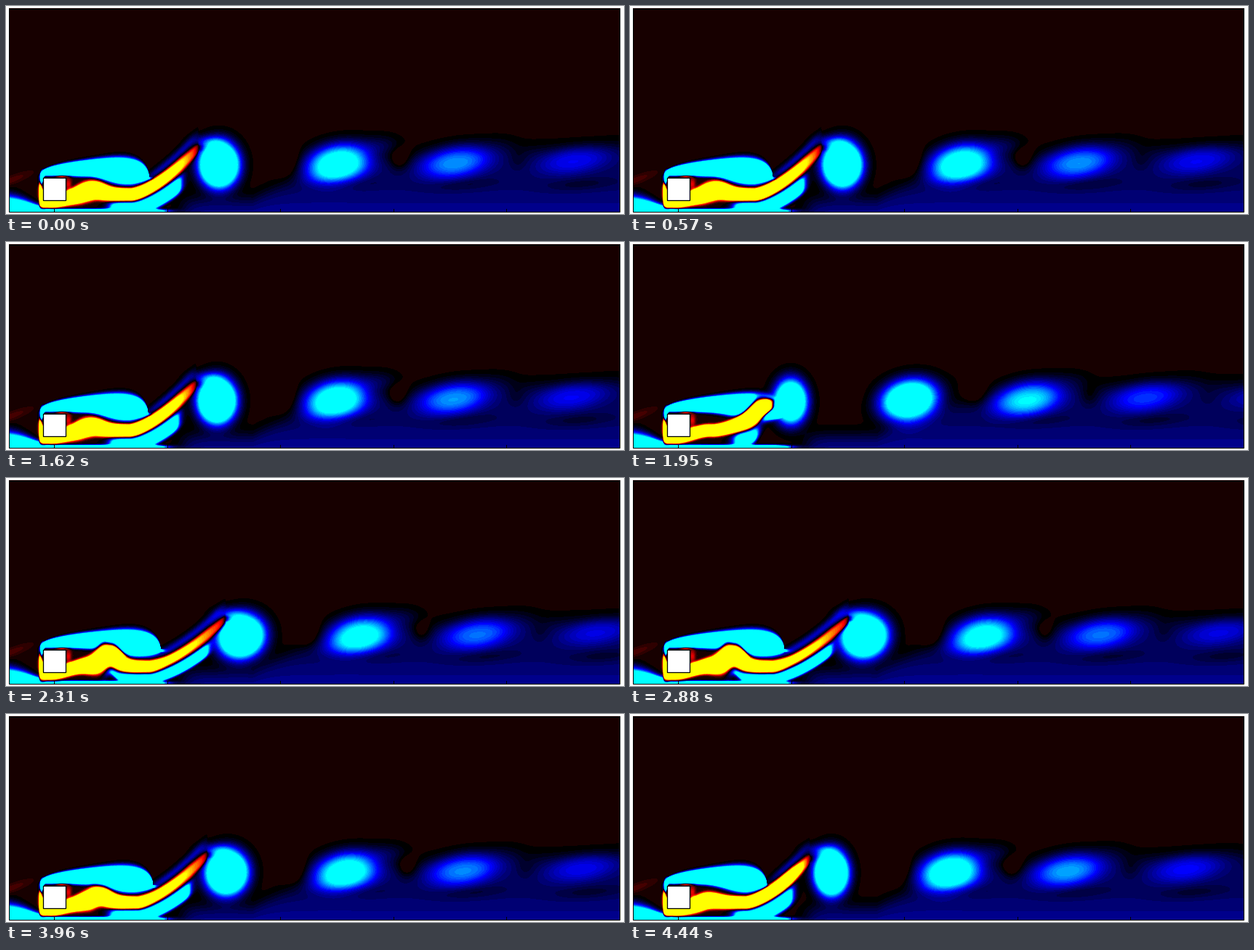
A matplotlib script for the animation above (4470 ms loop, 850 by 287 pixels).

```python
import numpy as np
import matplotlib.pyplot as plt
from matplotlib.animation import FuncAnimation
from matplotlib.colors import ListedColormap
from matplotlib.patches import Rectangle

W, H, DPI = 850, 287, 64
PX = 72 / DPI
FRAMES, INTERVAL = 149, 30
PERIOD, SPACING = 19.11, 163      # frames per shedding cycle, px between vortices
FULL = 60                         # peak strength of a shear layer, in colour bands

X0, X1, Y0, Y1, NEAR = 4, 845, 160, 284, 376
x = np.arange(X0, X1, dtype=np.float32) + 0.5
y = (np.arange(Y0, Y1, dtype=np.float32) + 0.5)[:, None]
xn = x[:NEAR]


def sig(v):
    return 1 / (1 + np.exp(-np.clip(v, -40, 40)))


def smooth(v):
    v = np.clip(v, 0, 1)
    return v * v * (3 - 2 * v)


def flat(u):
    return np.exp(-np.square(np.square(u)))


def bump(cx, cy, sx, sy, tilt=0, power=1, gx=x):
    dx = gx - cx
    r2 = (dx / sx) ** 2 + ((y - cy + tilt * dx) / sy) ** 2
    return np.exp(-r2 ** power if power != 1 else -r2)


def static_layers():
    """Background, slow wake over the floor and the incoming wall layer."""
    top = 195 + 72 * np.exp(-np.clip(x - 340, 0, None) / 125)
    depth = 5 + 2 * np.clip((y - 245) / 38, 0, 1)
    wake = depth * sig((y - top) / 6) * sig((x - 245) / 7)
    height = 2.5 + 14 * sig((34 - x) / 12)
    wall = 80 * sig((210 - x) / 8) * np.exp(-((283 - y) / height) ** 2)
    return (0.4 - wake - wall).astype(np.float32)


BASE = static_layers()
BODY_SKIN = (2.3 * bump(8, 240, 26, 6, 0.36, gx=xn)
             + 20 * bump(77, 235, 9, 1.6, gx=xn)
             + 9 * bump(86, 246, 4, 10, gx=xn))


def add_vortex(w, cx):
    """One shed vortex; it widens, flattens and weakens downstream."""
    grown = smooth((cx - 190) / 45)
    if grown == 0:
        return
    s = (cx - 293) / SPACING
    age = max(s, 0)
    w -= (58 * grown * 2.05 ** -age
          * bump(cx, 219 - 2.2 * s, 48 - 22 * np.exp(-1.5 * max(s, -0.1)),
                 30 - 4 * age, 0.14 * (1 - np.exp(-3 * age)), 1.35))
    curl = smooth((cx - 240) / 30) * smooth((370 - cx) / 60)
    if curl:
        w -= 8 * curl * bump(cx - 14, 187, 20, 8)
    far = smooth((s - 0.5) / 0.4)
    if far:
        late = far * np.exp(-max(s - 1, 0))
        w -= 3.5 * late * bump(cx + 60, 192, 26, 13)
        w += 4 * late * bump(cx + 84, 212, 12, 14)
        w += 5 * late * bump(cx - 70, 212, 16, 18)
        w += 2.2 * far * bump(cx + 8, 246, 45, 9, 0.08)


def upper_layer(p):
    """Sheet over the body: it stretches, then drops its end as a vortex."""
    end = 197 + 85 * p - 85 * smooth((p - 0.45) / 0.25)
    v = np.clip((xn - 46) / (end - 46), 0.001, 1)
    top = 236 - 31 * v ** 0.35 * np.sqrt(1 - v ** 7)
    low = 234 + 12 * np.exp(-((v - 0.8) / 0.25) ** 2) + 12 * sig((51 - xn) / 0.7)
    ends = sig((xn - 47) / 0.8) * sig((end - xn) / 3)
    return FULL * ends * flat((2 * y - top - low) / np.maximum(low - top, 3))


def lower_layer(p, age):
    """Signed distance, half width and tip of the sheet under the body.

    A hump drifts along it and ends up as the arm that rises to the tip.
    """
    tip = 165 + 15 * age + 85 * age ** 2
    trough = 172 + 130 * (age - 1)
    rise = np.clip((xn - trough) / (tip - trough), 0, 1) ** 1.5
    line = 260 + 10 * (1 - smooth((xn - 60) / 50)) - 66 * smooth(age / 1.1) * rise
    line -= 9 * np.clip((58 - xn) / 11, 0, 1.2) ** 2
    half = 8 - 1.8 * smooth((age - 0.9) / 0.3) * smooth((xn - trough) / 30)
    for a in (p, p - 1):
        crest = 122 + 110 * a
        line -= 15 * np.exp(-((a - 0.3) / 0.3) ** 2 - ((xn - crest) / 18) ** 2)
        half = half + 5.5 * flat((a - 0.25) / 0.4) * np.exp(-((xn - crest + 8) / 26) ** 2)
    half = half * (0.45 + 0.55 * np.sqrt(np.clip((tip - xn) / 25, 0, 1)))
    dist = (y - line) / np.sqrt(1 + np.gradient(line, xn) ** 2)
    return dist, half, tip


def field(phase):
    p = phase % 1
    w = BASE.copy()
    for k in range(-1, 5):
        add_vortex(w, 293 + SPACING * (p + k))

    near = w[:, :NEAR]
    near -= upper_layer(p)
    positive, keep = 0, 1
    for age in (p, p + 1):
        if not 0.18 <= age < 1.45:
            continue
        dist, half, tip = lower_layer(p, age)
        fade = min(1, (1.45 - age) / 0.27)
        thin = smooth((age - 0.9) / 0.3)
        ends = fade * sig((xn - 46) / 0.8) * sig((tip - xn) / 2.5)
        reach = 12 + 150 * smooth((age - 0.8) / 0.4)
        amp = 9 + (FULL - 9) * np.clip((tip - xn) / reach, 0, 1)
        positive = np.maximum(positive, amp * ends * flat(dist / half))
        keep = keep * (1 - ends * flat(dist / (1.45 * half)))
        # floor vorticity lifted under the arm, and a faint sheet above it
        span = fade * sig((xn - 145) / 4) * sig((tip - 25 - xn) / 3)
        near -= 45 * span * flat((dist - 20 + 4 * thin) / (10 - 3 * thin))
        span = fade * sig((xn - 195) / 6) * sig((tip - 8 - xn) / 5)
        near -= 9 * span * np.exp(-((dist + 13) / 6) ** 2)

    np.minimum(w, 0.5, out=w)
    near *= keep
    near += positive + BODY_SKIN
    return np.clip(np.floor(w), -23, 21)


def band_colour(i):
    """Cyan - blue - black - red - yellow."""
    c = (i + 1) / 11
    first, second = min(abs(c), 1), max(abs(c) - 1, 0)
    return (0, second, first) if c < 0 else (first, second, 0)


def phase_at(n):
    # the flow runs slightly ahead for part of the loop
    return (n + 3 * np.clip((n - 19) / 35, 0, 1)) / PERIOD


bands = ListedColormap([band_colour(i) for i in range(-23, 22)])

fig = plt.figure(figsize=(W / DPI, H / DPI), dpi=DPI, facecolor="white")
ax = fig.add_axes([0, 0, 1, 1])
ax.axis("off")
ax.add_patch(Rectangle((4, 3), 841, 281, fc=band_colour(0), ec="none"))
image = ax.imshow(field(0), cmap=bands, vmin=-23.5, vmax=21.5, aspect="auto",
                  extent=(X0, X1, Y1, Y0), interpolation="nearest", zorder=2)
ax.set_xlim(0, W)
ax.set_ylim(H, 0)
ax.add_patch(Rectangle((51.5, 236.5), 31, 31, fc="white", ec="black",
                       lw=1.3 * PX, zorder=3))
ax.add_patch(Rectangle((4.5, 3.5), 840, 280, fc="none", ec="black",
                       lw=PX, zorder=4))
for i in range(5):
    tick = 66.5 + 155.5 * i
    ax.plot([tick, tick], [279.5, 283.5], color="black", lw=PX, zorder=4)


def update(n):
    image.set_data(field(phase_at(n)))
    return [image]


anim = FuncAnimation(fig, update, frames=FRAMES, interval=INTERVAL,
                     repeat=True, repeat_delay=0, blit=False)
plt.show()
```
